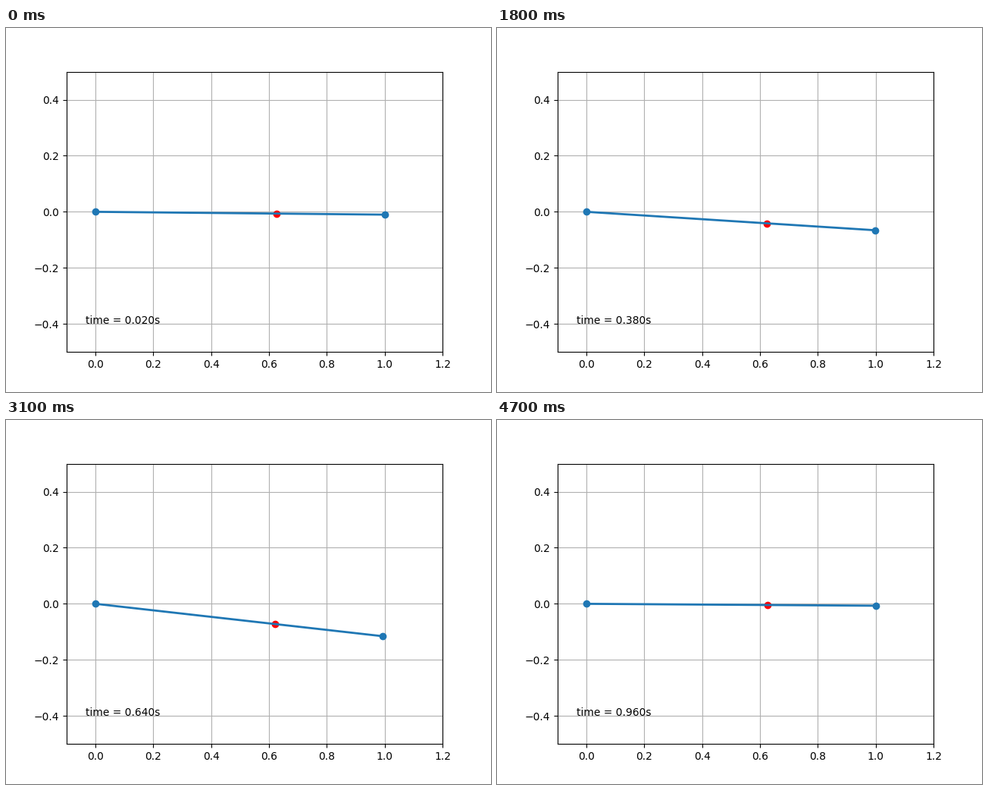
A matplotlib script for the animation above (4.8 s loop, 640x480 px).

```python
import numpy as np
import matplotlib.pyplot as plt
from matplotlib.animation import FuncAnimation

FRAMES = 48
INTERVAL = 100     # ms per frame
DT = 0.02          # simulated seconds per frame
SWING = 0.087      # rad, amplitude and mean sag
OMEGA = 12.43      # rad/s
LEAD = 0.019       # s, phase lead
LENGTH = 1.0
SPRING_AT = 0.625  # attachment point along the bar


def angle(t):
    return -SWING * (1 - np.cos(OMEGA * (t + LEAD)))


fig, ax = plt.subplots(figsize=(6.4, 4.8), dpi=100)
ax.set_xlim(-0.1, 1.2)
ax.set_ylim(-0.5, 0.5)
ax.grid()

joint, = ax.plot([], [], "o", color="red")
bar, = ax.plot([], [], "o-", color="tab:blue", lw=2)
label = ax.text(0.05, 0.1, "", transform=ax.transAxes)


def update(i):
    t = (i + 1) * DT
    a = angle(t)
    x, y = LENGTH * np.cos(a), LENGTH * np.sin(a)
    bar.set_data([0, x], [0, y])
    joint.set_data([SPRING_AT * x], [SPRING_AT * y])
    label.set_text(f"time = {t:.3f}s")
    return joint, bar, label


anim = FuncAnimation(fig, update, frames=FRAMES, interval=INTERVAL,
                     repeat=True, repeat_delay=0)
plt.show()
```
